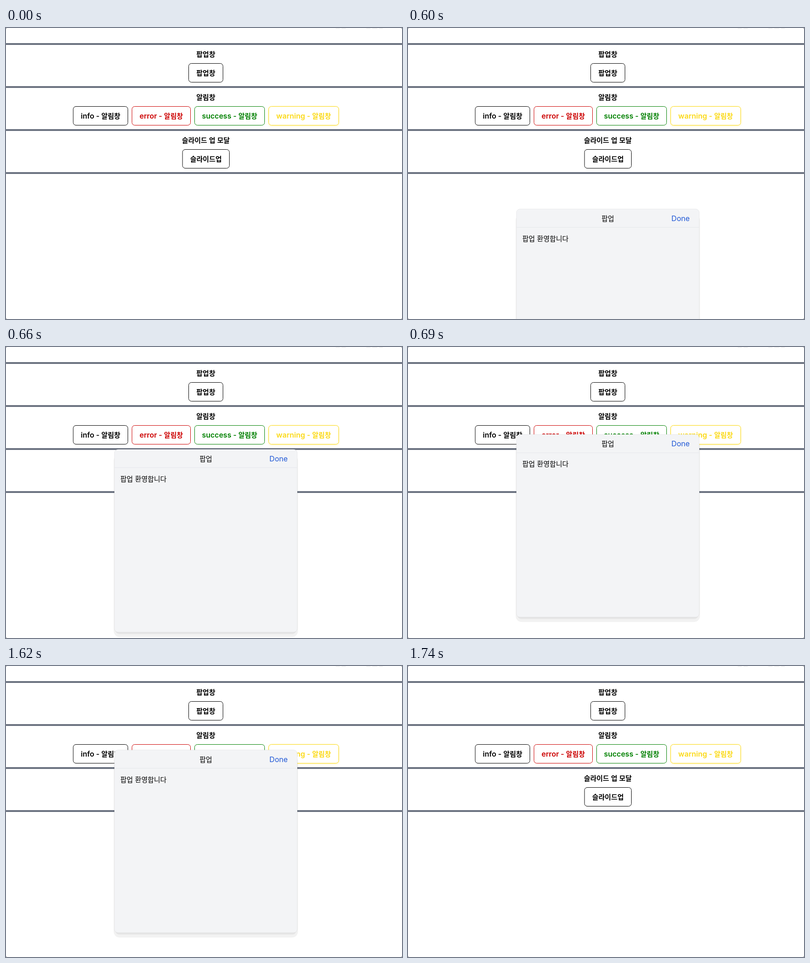
An HTML page that plays this animation: 866 px wide and 636 px high, repeating every 2.49 s.

```html
<!DOCTYPE html>
<html lang="ko">
<head>
<meta charset="utf-8">
<style>
  html, body { margin: 0; width: 100%; height: 100%; overflow: hidden; background: #fff; }
  svg { display: block; width: 866px; height: 636px; }
  text { font: 16px Inter, "Noto Sans CJK KR", "Noto Sans CJK", sans-serif; white-space: pre; }
  .bold { font-weight: 600; }
  .hangul { font-size: 15px; font-family: "Noto Sans CJK KR", "Noto Sans CJK", sans-serif; }
  .glow { filter: drop-shadow(0 1px 2px rgba(255, 215, 0, .3)); }
</style>
</head>
<body>
<svg viewBox="0 0 866 636">
  <g id="page"></g>
  <g id="popup"></g>
</svg>
<script>
const LOOP = 2490, STEP = 30;
const REST_Y = 178, TRAVEL = 537;
const page = document.getElementById('page');
const popup = document.getElementById('popup');

const rect = (x, y, w, h, attrs) =>
  `<rect x="${x}" y="${y}" width="${w}" height="${h}" ${attrs}/>`;

// Hangul runs are set slightly smaller than the Latin around them.
const label = (x, y, text, attrs = '') =>
  `<text x="${x}" y="${y}" ${attrs}>${text.replace(/[가-힣]+/g, '<tspan class="hangul">$&</tspan>')}</text>`;

const centred = (x, y, text, color = '#000') =>
  label(x, y, text, `class="bold" text-anchor="middle" fill="${color}"`);

const button = (left, right, top, text, color = '#000', cls = '') =>
  rect(left + .5, top + .5, right - left - 1, 41, `rx="6" fill="#fff" stroke="${color}" class="${cls}"`) +
  centred((left + right) / 2, top + 27, text, color);

const bars = [33, 127, 221, 315].map(y => rect(0, y, 866, 4, 'fill="#6b7280"'));
const topMarks = [[721, 9], [734, 9], [788, 9], [801, 11], [816, 8]]
  .map(([x, w]) => rect(x, 0, w, 1, 'fill="#e6e6e6"'));

page.innerHTML = [
  ...bars, ...topMarks,
  centred(437, 63, '팝업창'),
  button(399, 475, 77, '팝업창'),
  centred(437, 157, '알림창'),
  button(146.5, 267, 171, 'info - 알림창'),
  button(275, 404, 171, 'error - 알림창', '#cc0000'),
  button(412, 566, 171, 'success - 알림창', '#008000'),
  button(574, 728, 171, 'warning - 알림창', '#fbd915', 'glow'),
  centred(437, 251, '슬라이드 업 모달'),
  button(385.5, 489, 265, '슬라이드업'),
  '<path d="M0 0h2L0 2zM866 0h-2l2 2zM0 636h2l-2-2zM866 636h-2l2-2z" fill="#999"/>'
].join('');

popup.innerHTML = [
  rect(235.5, 12, 403, 398, 'rx="13" fill="#000" fill-opacity=".05"'),
  rect(239, 20, 396, 383.5, 'rx="9" fill="#000" fill-opacity=".05"'),
  rect(237, 0, 400, 399.5, 'rx="8" fill="#f3f4f6" stroke="#000" stroke-opacity=".06"'),
  rect(237, 39.5, 400, 1, 'fill="#e5e7eb"'),
  label(437, 26, '팝업', 'text-anchor="middle"'),
  label(616, 26, 'Done', 'text-anchor="end" fill="#2058d6"'),
  label(250, 70, '팝업 환영합니다')
].join('');

// Fraction of the travel still below the resting place: cubic out, then its reverse.
function popupOffset(t) {
  if (t < 570 || t >= 1740) return null;
  const left = t < 1200 ? (748 - t) / 200 : (t - 1587.4) / 150;
  return TRAVEL * Math.max(0, left) ** 3;
}

function draw(now) {
  const t = Math.floor(now % LOOP / STEP) * STEP;
  const offset = popupOffset(t);
  popup.style.display = offset === null ? 'none' : '';
  if (offset !== null) popup.setAttribute('transform', `translate(0 ${REST_Y + offset})`);
}

const start = performance.now();
function tick() {
  draw(performance.now() - start);
  requestAnimationFrame(tick);
}
tick();
</script>
</body>
</html>
```
